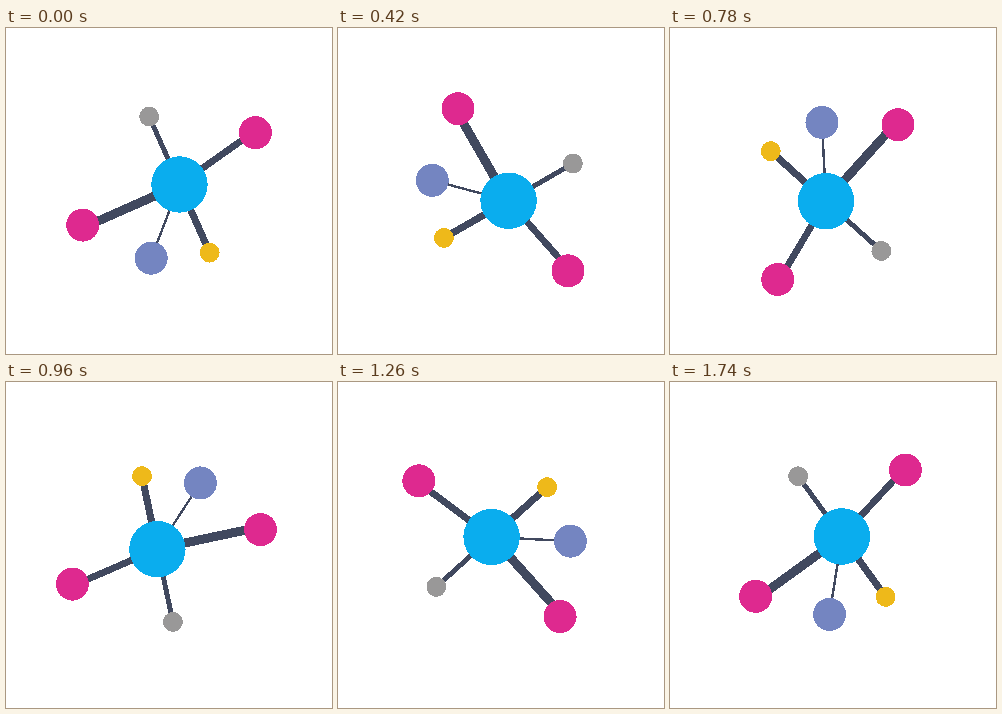
An HTML page for the animation above (1.8 s loop, 326 by 326 pixels).

```html
<!DOCTYPE html>
<html lang="en">
<head>
<meta charset="utf-8">
<title>Spinning molecule</title>
<style>
  html, body { margin: 0; width: 100%; height: 100%; overflow: hidden; background: #fff; }
  svg { display: block; width: 100%; height: 100%; }
</style>
</head>
<body>
<svg viewBox="0 0 326 326" shape-rendering="crispEdges">
  <g id="molecule">
    <g stroke="#41495f">
      <path d="M173.5 156.5L143.2 88.6" stroke-width="5"/>
      <path d="M173.5 156.5L248.6 103.3" stroke-width="6.8"/>
      <path d="M173.4 157L77.6 199.5" stroke-width="9"/>
      <path d="M173.5 156.5L145.2 230.2" stroke-width="2.4"/>
      <path d="M173.5 156.5L203.7 224.7" stroke-width="7.1"/>
    </g>
    <circle cx="173.5" cy="156.5" r="28.2" fill="#0aadee"/>
    <circle cx="143.2" cy="88.6" r="9.9" fill="#999898"/>
    <circle cx="249.4" cy="104.7" r="16.5" fill="#de298f"/>
    <circle cx="76.7" cy="197.1" r="16.5" fill="#de298f"/>
    <circle cx="145.2" cy="230.2" r="16.5" fill="#7485c1"/>
    <circle cx="203.7" cy="224.7" r="9.9" fill="#eeb91a"/>
  </g>
</svg>
<script>
  const LOOP = 1800, STEPS = 30;
  const molecule = document.getElementById('molecule');
  const start = performance.now();

  // One clockwise turn per loop, in discrete steps.
  function render(time) {
    const step = Math.floor((time % LOOP) / (LOOP / STEPS));
    molecule.setAttribute('transform', `rotate(${step * 360 / STEPS} 163 163)`);
  }

  function tick() {
    render(performance.now() - start);
    requestAnimationFrame(tick);
  }
  tick();
</script>
</body>
</html>
```
